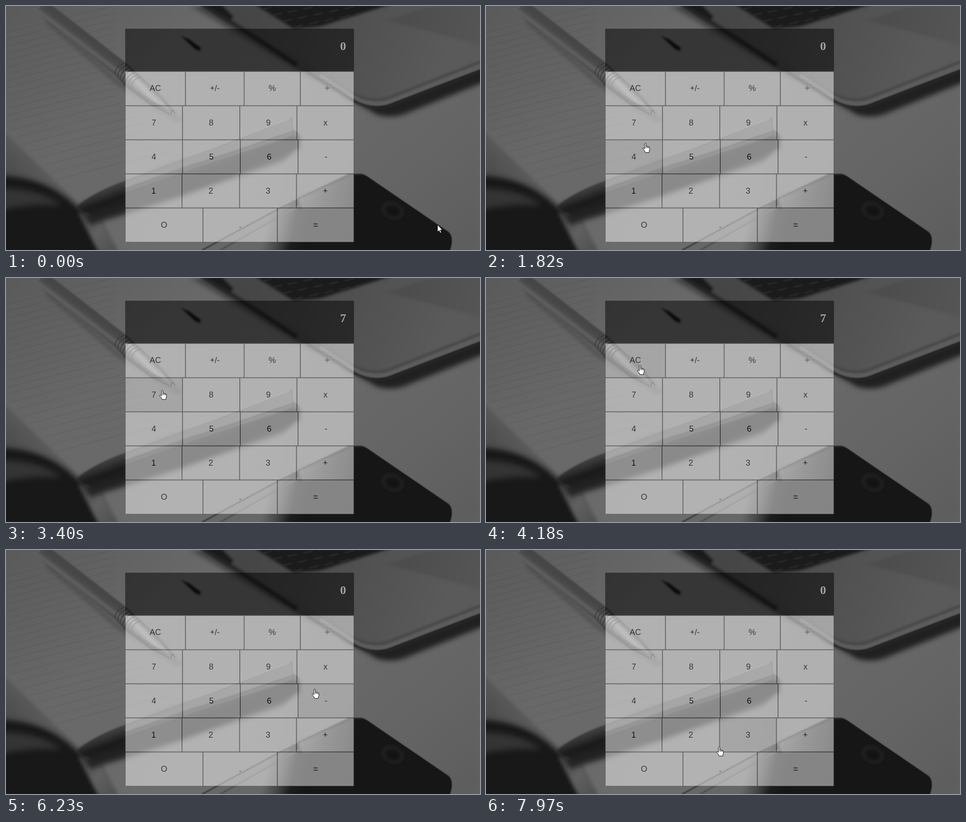
These frames come from a looping animation (1042 by 537 pixels, 8 s). An HTML page with a canvas:

```html
<!DOCTYPE html>
<html lang="en">
<head>
<meta charset="utf-8">
<title>Calculator</title>
<style>
html, body { margin: 0; width: 100%; height: 100%; overflow: hidden; background: #646464; }
canvas { display: block; }
</style>
</head>
<body>
<canvas id="stage" width="1042" height="537"></canvas>
<script>
const W = 1042, H = 537, LOOP = 8000, STEP = 78.9, PANEL_ALPHA = 0.48;
const ctx = document.getElementById("stage").getContext("2d");

function layer() {
  const c = document.createElement("canvas");
  c.width = W;
  c.height = H;
  return c.getContext("2d");
}

// ---------- desk photo, simplified to soft shapes ----------
const photo = layer();

function linear(x0, y0, x1, y1, ...colors) {
  const g = photo.createLinearGradient(x0, y0, x1, y1);
  colors.forEach((c, i) => g.addColorStop(i / (colors.length - 1), c));
  return g;
}
function shape(d, fill, blur = 0.6) {
  photo.filter = `blur(${blur}px)`;
  photo.fillStyle = fill;
  photo.fill(new Path2D(d));
  photo.filter = "none";
}
function stroke(d, color, width = 1, blur = 0.5) {
  photo.filter = `blur(${blur}px)`;
  photo.strokeStyle = color;
  photo.lineWidth = width;
  photo.stroke(new Path2D(d));
  photo.filter = "none";
}

function paintDesk() {
  photo.fillStyle = linear(0, 0, 420, 460, "#5a5a5a", "#686868", "#6b6b6b");
  photo.fillRect(0, 0, W, H);
  shape("M700 100H1060V560H600V300Z", linear(780, 220, 1042, 537, "#686868", "#646464", "#5c5c5c"), 20);
  shape("M-20 262L165 440L120 470H-20Z", linear(90, 330, 10, 400, "#606060", "#484848"), 3);
}

function paintRules() {
  for (let i = 0; i < 22; i++) {
    const y = 62 + i * 15.2;
    const x = Math.max(-10, (y - 270) * 1.03);
    stroke(`M${x} ${y}Q${x + 110} ${y - 30} ${x + 250} ${y - 62}`, "rgba(0,0,0,.08)", 1.2, 0.6);
  }
}

function paintLaptop() {
  shape("M740 195L800 230Q825 250 870 240L1060 164V126L840 190Z", "rgba(20,20,20,.85)", 6);
  shape("M405 0L650 146L775 214L720 150L520 0Z", "rgba(20,20,20,.4)", 5);
  shape("M430 -5L525 52L768 208Q800 226 838 216L1060 132V-10Z", linear(560, 20, 960, 160, "#464646", "#505050", "#5a5a5a"), 1.5);
  stroke("M520 46L765 194Q800 212 838 203L1060 116", "#464646", 5, 2);
  stroke("M690 152L765 201Q802 222 838 213L1060 127", "#5c5c5c", 8, 1.5);
  stroke("M660 143L765 209Q802 230 838 222L1060 138", "#292929", 4, 2);
  shape("M840 32L900 10L960 -5H1060V90Z", linear(860, 20, 1042, 60, "#4c4c4c", "#555"), 3);
  stroke("M430 -4L530 58L640 130", "#242424", 9, 3);
  shape("M430 -5H472L500 24L492 32Z", "#1a1a1a", 3);
  shape("M545 -5L632 50L690 45L850 -5Z", "#1b1b1b", 3);
  for (let row = 0; row < 4; row++) {
    for (let key = 0; key < 8; key++) {
      const x = 562 + row * 23 + key * 34;
      const y = 8 + row * 13 - key * 7;
      if (y > -12 && x < 790) stroke(`M${x} ${y}l21 -5`, "#333", 2, 1.4);
    }
  }
}

function paintNotebook() {
  // cover and ribbon at the lower left
  shape("M-20 374Q85 372 156 442L200 460L235 550H-20Z", "#181818", 6);
  shape("M-20 402Q70 398 125 440Q70 432 -20 450Z", "#343434", 7);
  shape("M158 455L197 450L250 545H205Z", linear(160, 460, 245, 530, "#444", "#606060", "#505050"), 4);
  // spine and its shadow, running to the upper right
  shape("M185 482L262 458L388 418L515 373L610 340L645 312V290L630 275L380 345L250 397L158 440Z", "#262626", 6);
  shape("M160 440Q195 408 262 385L628 260L632 285L390 365L262 410L180 462Z", linear(390, 320, 402, 360, "#5c5c5c", "#4c4c4c", "#383838"), 1.5);
  shape("M155 443Q190 413 262 388V445L195 466Z", linear(210, 410, 226, 454, "#3c3c3c", "#1a1a1a", "#222"), 2);
  shape("M388 378L515 332L638 286L643 308L515 364L388 410Z", "#1e1e1e", 4);
  shape("M262 386L606 258Q628 252 629 244V278L400 350L262 400Z", linear(300, 380, 629, 260, "#545454", "#565656", "#5c5c5c"), 1);
  stroke("M262 386L606 258Q628 252 629 244V280", "#484848", 1.3, 0.7);
  stroke("M262 404L515 316L630 276Q646 280 644 294", "#303030", 2.5, 1);
}

function paintPhone() {
  shape("M425 545L600 446L752 371H780Q789 372 796 377L973 498Q986 511 973 545Z", linear(575, 470, 665, 490, "#666", "#484848", "#1c1c1c", "#161616"), 1.2);
  shape("M765 370H780Q789 371 796 377L973 498Q986 511 973 545H655L665 445Z", "#161616", 1);
  shape("M640 420L765 371V445H650Z", linear(645, 405, 765, 440, "#5c5c5c", "#383838", "#202020"), 2);
  stroke("M430 538L600 446L752 371H784", "#2a2a2a", 2.5, 0.8);
  stroke("M470 538L600 464L680 420", "#4c4c4c", 3, 1.2);
  shape("M825 447a25 19 25 1 0 50 6a25 19 25 1 0 -50 -6Z", "#1f1f1f", 2);
  shape("M836 448a15 11 25 1 0 29 5a15 11 25 1 0 -29 -5Z", "#131313", 3);
}

function paintPen() {
  stroke("M90 32L250 172L385 252", "rgba(20,20,20,.25)", 9, 5);
  shape("M70 8Q75 -4 100 -2L126 18L266 127L344 200L373 234L371 241L362 240L318 218L260 174L238 151L76 20Z",
    linear(172, 65, 150, 94, "#464646", "#4a4a4a", "#606060", "#4a4a4a", "#303030"), 1.4);
  shape("M264 130L342 202L362 229L320 207L258 163Z", linear(312, 174, 294, 192, "#606060", "#868686", "#5a5a5a"), 1);
  for (let i = 0; i < 7; i++) {
    const x = 239 + i * 6, y = 149 + i * 5;
    stroke(`M${x} ${y}Q${x + 3} ${y - 18} ${x + 21} ${y - 23}`, "#383838", 1.5, 0.6);
  }
  stroke("M258 173L318 217L362 239", "#404040", 1.5);
  stroke("M275 143L340 203L365 234", "#484848", 1.2);
  stroke("M362 238L366 229L372 237", "#303030", 2);
  shape("M385 66L402 73L427 91L428 99L416 95Z", "#141414", 2);
}

paintDesk();
paintRules();
paintLaptop();
paintNotebook();
paintPhone();
paintPen();

// ---------- calculator ----------
const LEFT = 262, RIGHT = 765;
const ROWS = [
  { y: 144, labels: ["AC", "+/-", "%", "÷"], splits: [394.5, 523.5, 647] },
  { y: 219.5, labels: ["7", "8", "9", "x"], splits: [388, 514, 639.5] },
  { y: 294.5, labels: ["4", "5", "6", "-"], splits: [388, 515, 642] },
  { y: 369.5, labels: ["1", "2", "3", "+"], splits: [387, 513.5, 638.5] },
  { y: 444.5, labels: ["O", ".", "="], splits: [433, 596.5] },
];
const panel = layer();

function drawPanel(value, hovered, pressed) {
  panel.clearRect(0, 0, W, H);
  panel.fillStyle = "#5c5c5c";
  panel.fillRect(LEFT, 50, RIGHT - LEFT, 470);
  panel.fillStyle = "#000";
  panel.fillRect(LEFT, 50, RIGHT - LEFT, 93.5);
  panel.fillStyle = "#fff";
  panel.font = "bold 26px 'Liberation Serif', serif";
  panel.textAlign = "right";
  panel.fillText(value, 747.5, 97);

  panel.font = "18px 'Liberation Sans', sans-serif";
  panel.textAlign = "center";
  ROWS.forEach(({ y, labels, splits }, r) => {
    const xs = [LEFT, ...splits, RIGHT];
    const bottom = r < 4 ? ROWS[r + 1].y : 520;
    labels.forEach((label, i) => {
      const x = xs[i], right = xs[i + 1];
      panel.fillStyle = label === pressed ? "#d0d0d0" : label === hovered ? "#e6e6e6" : "#fff";
      panel.fillRect(x + 0.9, y + 0.9, right - x - 1.8, bottom - y - 1.8);
      panel.fillStyle = "#000";
      panel.fillText(label, (x + right) / 2, Math.round(y + 43));
    });
  });
  ctx.globalAlpha = PANEL_ALPHA;
  ctx.drawImage(panel.canvas, 0, 0);
  ctx.globalAlpha = 1;
}

// ---------- pointer ----------
// [step, x, y, hovered area, pointer override]
const PATH = [
  [0, 948, 481], [3, 948, 474], [4, 948, 474], [5, 980, 473], [8, 850, 486],
  [9, 735, 484, "="], [11, 570, 468, "."], [13, 545, 415, "3"], [15, 509, 363, "3", "arrow"],
  [16, 490, 350, "5"], [20, 400, 330, "5"], [21, 370, 322, "4"], [24, 340, 290, "7"],
  [26, 345, 310, "4"], [29, 350, 305, "4"], [32, 347, 287, "7"], [36, 342, 248, "7"],
  [42, 342, 248, "7"], [43, 343, 246, "7"], [46, 400, 240, "8"], [48, 392, 228, "8"],
  [49, 370, 212, "AC"], [53, 338, 191, "AC"], [56, 336, 200, "AC"], [69, 336, 200, "AC"],
  [70, 342, 208, "AC"], [71, 355, 255, "7"], [72, 375, 320, "4"], [73, 410, 390, "2"],
  [75, 470, 460, "."], [76, 500, 490, "", "none"], [78, 665, 340, "-"], [80, 690, 270, "x"],
  [82, 715, 190, "÷"], [84, 735, 120, "display"], [85, 742, 87, "display"], [87, 742, 88, "display"],
  [90, 742, 92, "display"], [92, 735, 130, "display"], [93, 715, 180, "÷"], [94, 690, 250, "x"],
  [96, 610, 330, "6"], [97, 580, 357, "6"], [98, 565, 376, "3"], [101, 512, 432, "3"],
];
const ARROW = new Path2D("M.5 .5V16.5L4 13L6.6 18.7L9.2 17.6L6.7 12H11.6Z");
const HAND = new Path2D("M5 2Q6.5 -.4 8 2V7.6Q9.8 6.6 10.6 8.2Q12.4 7.4 13.2 9.2Q15.5 8.8 15.8 11V15.5Q14.6 18 14.3 21.5H6.6Q5.6 18 1 13.5Q.4 11.4 3 11.6L5 13.6Z");
const FINGERS = new Path2D("M8 7.6V11.5M10.6 8.2V11.8M13.2 9.2V12");

function pointerAt(step) {
  let i = PATH.length - 1;
  while (PATH[i][0] > step) i--;
  const [s, x, y, area = "", override] = PATH[i];
  const [s2, x2, y2] = PATH[i + 1] || [s + 1, x, y];
  const k = Math.min(1, (step - s) / (s2 - s));
  const kind = override || (area === "display" ? "beam" : area ? "hand" : "arrow");
  return { x: Math.round(x + (x2 - x) * k), y: Math.round(y + (y2 - y) * k), area, kind };
}

function drawPointer({ x, y, kind }) {
  if (kind === "none") return;
  ctx.save();
  ctx.translate(x, y);
  ctx.fillStyle = "#fff";
  ctx.strokeStyle = "#000";
  ctx.lineWidth = 1;
  if (kind === "beam") {
    ctx.globalCompositeOperation = "difference";
    ctx.fillRect(0, -8, 1, 17);
    for (const end of [-9, 9]) {
      ctx.fillRect(-3, end, 3, 1);
      ctx.fillRect(1, end, 3, 1);
    }
  } else {
    if (kind === "hand") ctx.translate(-6, 0);
    const outline = kind === "hand" ? HAND : ARROW;
    ctx.fill(outline);
    ctx.stroke(outline);
    if (kind === "hand") ctx.stroke(FINGERS);
  }
  ctx.restore();
}

// ---------- playback ----------
let shown = -1;

function render(now) {
  const step = Math.floor((now % LOOP + 25) / STEP);
  if (step !== shown) {
    shown = step;
    const pointer = pointerAt(step);
    const pressed = step === 37 ? "7" : step === 62 ? "AC" : "";
    const value = step >= 38 && step < 63 ? "7" : "0";
    ctx.drawImage(photo.canvas, 0, 0);
    drawPanel(value, pointer.area, pressed);
    drawPointer(pointer);
  }
  requestAnimationFrame(tick);
}

let start;
function tick(now) {
  start ??= now;
  render(now - start);
}
tick(performance.now());
</script>
</body>
</html>
```
